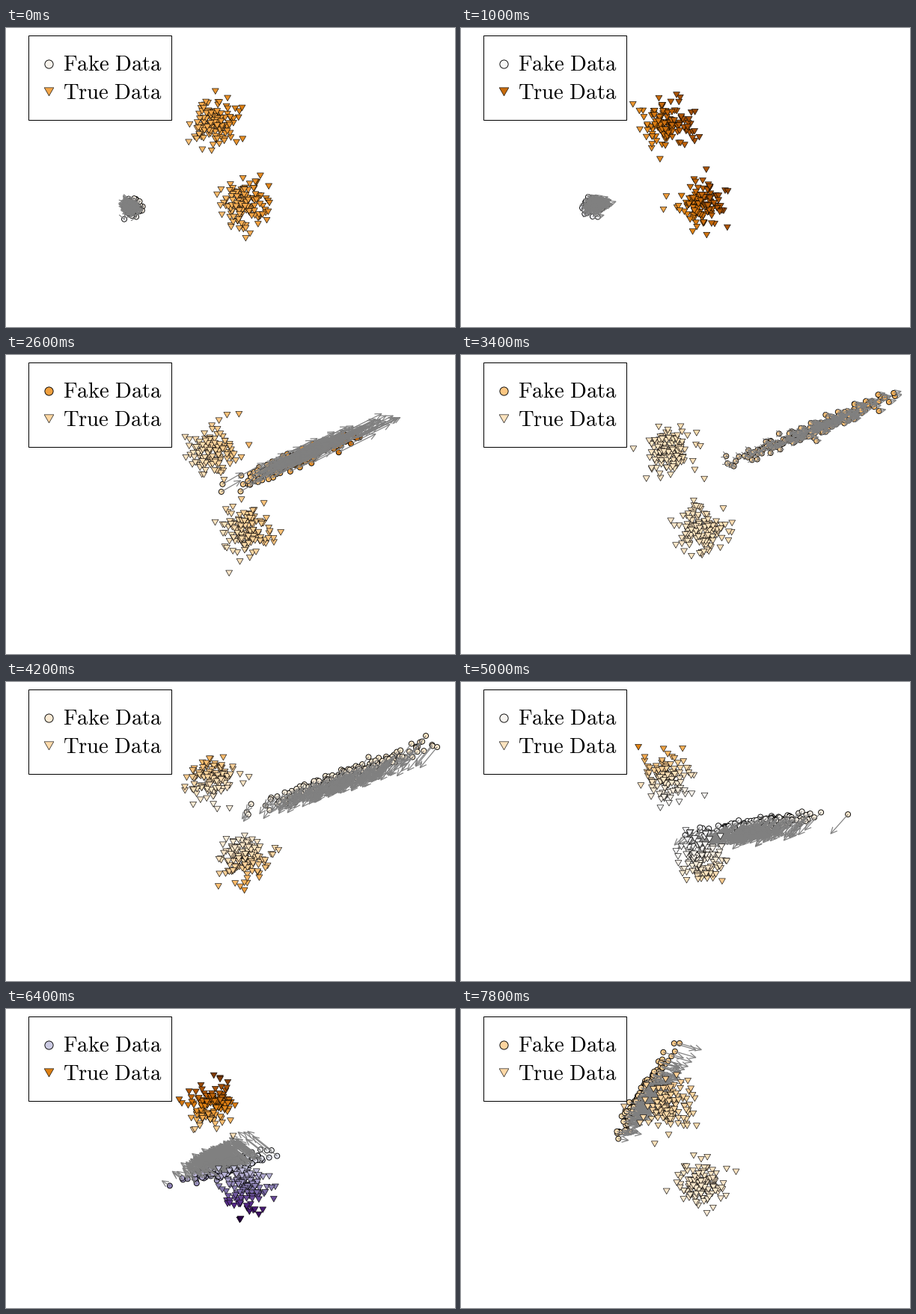
Recreate the animation shown at these times as a matplotlib script. Size 600x400 px, loop 8000 ms.

```python
import numpy as np
import matplotlib.pyplot as plt
from matplotlib.animation import FuncAnimation
from matplotlib.collections import LineCollection
from matplotlib.patches import Rectangle

W, H, DPI = 600, 400, 100
FRAMES, STEP = 40, 200
PT = 72 / DPI
LEFT, RIGHT, TOP, BOTTOM = 12, 589, 10, 390
N_FAKE, N_MODE = 256, 128
MODES = np.array([(276, 128), (320, 235)])
SPREAD, CROSS = 15.5, 4.5
GAIN = 1.25
CMAP = plt.get_cmap("PuOr")

# fake cloud every 0.8 s: centre x, y and long axis x, y
KEY_GAP = 0.8
PATH = np.array([
    (169, 239, 4.5, -0.5),
    (171, 239, 5, -1),
    (215, 223, 11, -4),
    (353, 157, 31, -13),
    (464, 101, 46, -19),
    (465, 113, 48, -19),
    (411, 176, 38, -8),
    (352, 225, 33, -3),
    (292, 211, 23, -6.5),
    (212, 118, 10, -23),
    (257, 119, 16, -22),
])
SLOPE = np.gradient(PATH, axis=0)


def cloud(t):
    """Centre and axis on a smooth path, and their change per frame."""
    i, s = divmod(t / KEY_GAP, 1)
    i = int(i)
    d, m0, m1 = PATH[i + 1] - PATH[i], SLOPE[i], SLOPE[i + 1]
    c2, c3 = 3 * d - 2 * m0 - m1, m0 + m1 - 2 * d
    place = PATH[i] + s * (m0 + s * (c2 + s * c3))
    speed = (m0 + s * (2 * c2 + 3 * s * c3)) * STEP / 1000 / KEY_GAP
    return place, speed


def bump(t, peak, width):
    return np.exp(-((t - peak) / width) ** 2)


def score(p, t):
    """Critic's verdict: below 0.5 orange, above 0.5 purple."""
    x, y = np.transpose(p) - np.array([298, 182]).reshape(2, *[1] * (np.ndim(p) - 1))
    mid = 0.395 - 0.25 * bump(t, 0.9, 1.1) + 0.13 * bump(t, 5.4, 1.5)
    tilt = 0.0025 * bump(t, 1.2, 1.6)
    rise = 0.0053 * bump(t, 6.4, 0.9)
    bend = 3.2e-5 * bump(t, 4.6, 0.6)
    return mid - tilt * (x - 0.4 * y) + rise * y - bend * (y + 0.3 * x) ** 2


def paint(p, t):
    return CMAP(np.clip(score(p, t), 0, 1))


def arrows(start, push, back=8.5, half=4):
    tip = start + push
    d = push / np.maximum(np.hypot(*push.T), 1e-6)[:, None]
    side = np.stack([-d[:, 1], d[:, 0]], axis=1) * half
    base = tip - d * back
    shafts = np.stack([start, tip], axis=1)
    heads = np.stack([base + side, tip, base - side], axis=1)
    return list(shafts) + list(heads)


plt.rcParams["mathtext.fontset"] = "cm"
fig = plt.figure(figsize=(W / DPI, H / DPI), dpi=DPI, facecolor="white")
ax = fig.add_axes([LEFT / W, 1 - BOTTOM / H, (RIGHT - LEFT) / W, (BOTTOM - TOP) / H])
ax.axis("off")


def markers(shape, size, line, z, xy=(0, 0)):
    return ax.scatter(*xy, s=(size * PT) ** 2, marker=shape, facecolor="white",
                      edgecolor="black", linewidth=line * PT, zorder=z)


DOWN = (3, 0, 180)
fake = markers("o", 7, 0.9, 1)
field = LineCollection([], colors="#808080", linewidths=1.2 * PT, zorder=2)
ax.add_collection(field, autolim=False)
true = markers(DOWN, 10.2, 0.6, 3)

ax.add_patch(Rectangle((29.5, 9.8), 191, 113.5, facecolor="white", edgecolor="black",
                       linewidth=PT, zorder=4, clip_on=False))
fake_key = markers("o", 11.2, 0.9, 5, (56.5, 47.7))
true_key = markers(DOWN, 14.6, 0.6, 5, (56.5, 83.3))
for word, y in (("Fake", 57), ("True", 95)):
    ax.text(76.2, y, rf"$\mathrm{{{word}\ Data}}$", fontsize=28.7 * PT,
            va="baseline", zorder=5)
ax.set(xlim=(LEFT, RIGHT), ylim=(BOTTOM, TOP))


def draw(i):
    t = i * STEP / 1000
    rng = np.random.default_rng(100 + i)

    pts = np.repeat(MODES, N_MODE, axis=0) + rng.normal(0, SPREAD, (2 * N_MODE, 2))
    true.set_offsets(pts)
    true.set_facecolor(paint(pts, t))

    place, speed = cloud(t)
    centre, axis = place[:2], place[2:]
    normal = np.array([-axis[1], axis[0]]) / np.hypot(*axis)
    u, v = rng.normal(size=(2, N_FAKE, 1))
    pos = centre + u * axis + v * CROSS * normal
    fake.set_offsets(pos)
    fake.set_facecolor(paint(pos, t))
    field.set_segments(arrows(pos, GAIN * (speed[:2] + u * speed[2:])))

    true_key.set_facecolor([paint(MODES[0], t)])
    fake_key.set_facecolor([paint(centre, t)])
    return fake, field, true, fake_key, true_key


anim = FuncAnimation(fig, draw, frames=FRAMES, interval=STEP, repeat=True,
                     repeat_delay=0, blit=False)
plt.show()
```
